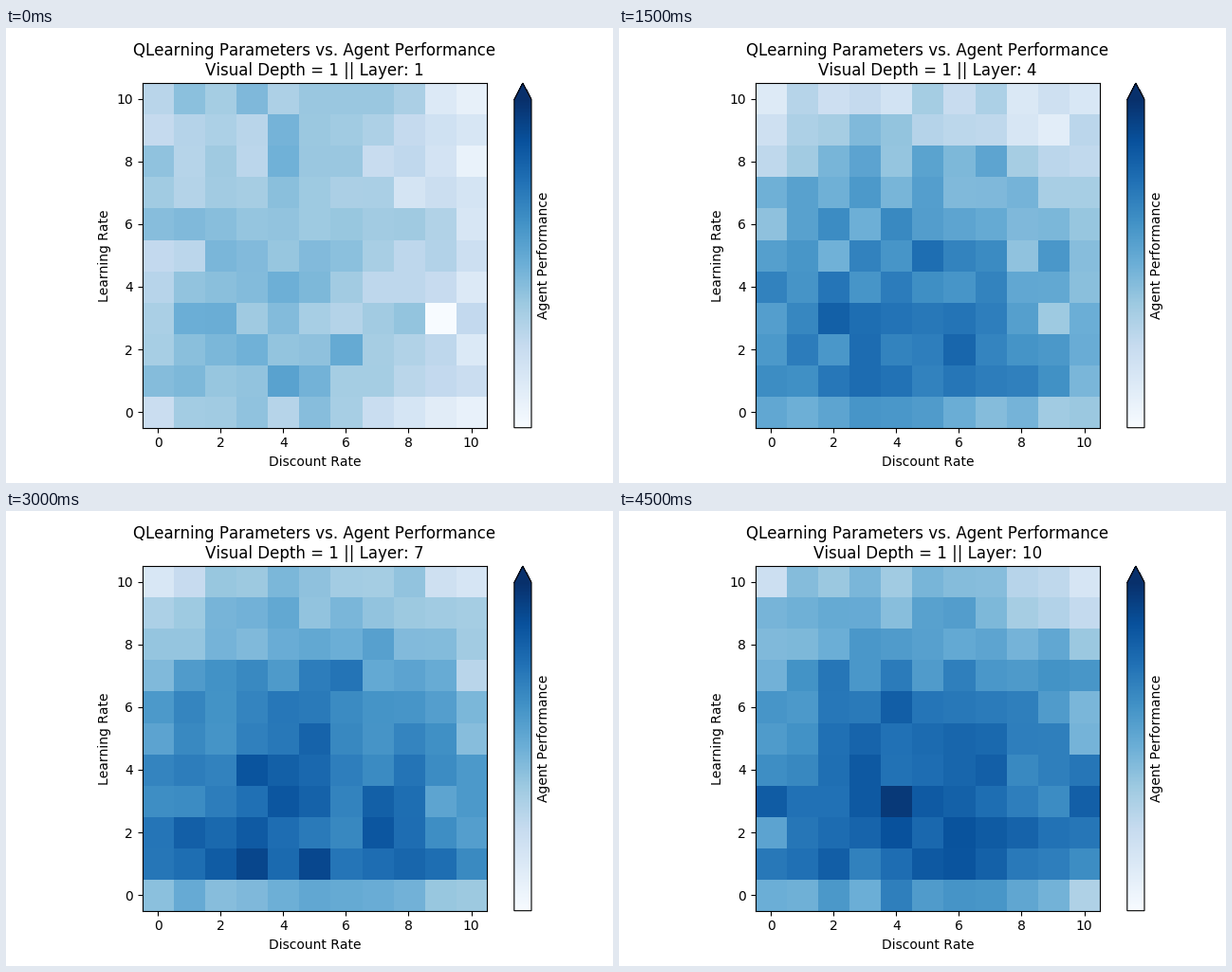
Write a matplotlib script that moves like this. It is 640 by 480 pixels and loops after 5 s.

```python
import numpy as np
import matplotlib.pyplot as plt
from matplotlib.animation import FuncAnimation

W, H, DPI = 640, 480, 100
LAYERS, N = 10, 11
TOP, SIDE = 58.1, 363.6
BAR_X, BAR_W = 535.8, SIDE / 20
PAD = 4 * DPI / 72

plt.rcParams.update({"font.family": "DejaVu Sans", "font.size": 10,
                     "text.kerning_factor": 6})


def scores(layer):
    """Agent performance by learning rate (rows) and discount rate (columns)."""
    rng = np.random.default_rng(40 + layer)
    grown = np.log(layer) / np.log(LAYERS)
    rate, discount = np.mgrid[0:N, 0:N]

    # Performance rises over the layers, most of all at low learning rates.
    best = .36 + .42 * grown ** .7
    fall = (.05 + .4 * min(1, 2 * grown)) * ((rate - 1) / 9) ** 2
    idle = (.06 + .2 * grown) * (rate == 0)

    # Middle discount rates do best; one high one lags until late.
    hump = .08 - .19 * ((discount - 3.5 - grown) / 5.5) ** 2
    lag = .25 * (1 - grown ** 4) * ((rate == 3) & (discount == 9))

    noise = rng.normal(0, .06, (N, N))
    return np.clip(best - fall - idle + hump - lag + noise, 0, 1)


def px_axes(left, top, width, height):
    return fig.add_axes([left / W, 1 - (top + height) / H, width / W, height / H])


def heading(layer):
    return f"QLearning Parameters vs. Agent Performance\nVisual Depth = 1 || Layer: {layer}"


fig = plt.figure(figsize=(W / DPI, H / DPI), dpi=DPI, facecolor="white")
ax = px_axes(143.5, TOP, SIDE, SIDE)
image = ax.imshow(scores(1), cmap="Blues", vmin=0, vmax=1, origin="lower",
                  interpolation="nearest", aspect="auto")
ax.set_xticks(range(0, N, 2))
ax.set_yticks(range(0, N, 2))
ax.set_xlabel("Discount Rate")
ax.set_ylabel("Learning Rate")
title = ax.set_title(heading(1), fontsize=12)

cax = px_axes(BAR_X, TOP, BAR_W, SIDE)
fig.colorbar(image, cax=cax, extend="max", ticks=[])
fig.text((BAR_X + BAR_W + PAD) / W, 1 - (TOP + SIDE / 2) / H,
         "Agent Performance", rotation=90, ha="left", va="center")


def update(i):
    image.set_data(scores(i + 1))
    title.set_text(heading(i + 1))
    return image, title


anim = FuncAnimation(fig, update, frames=LAYERS, interval=500, repeat=True,
                     repeat_delay=0, blit=False)
plt.show()
```
